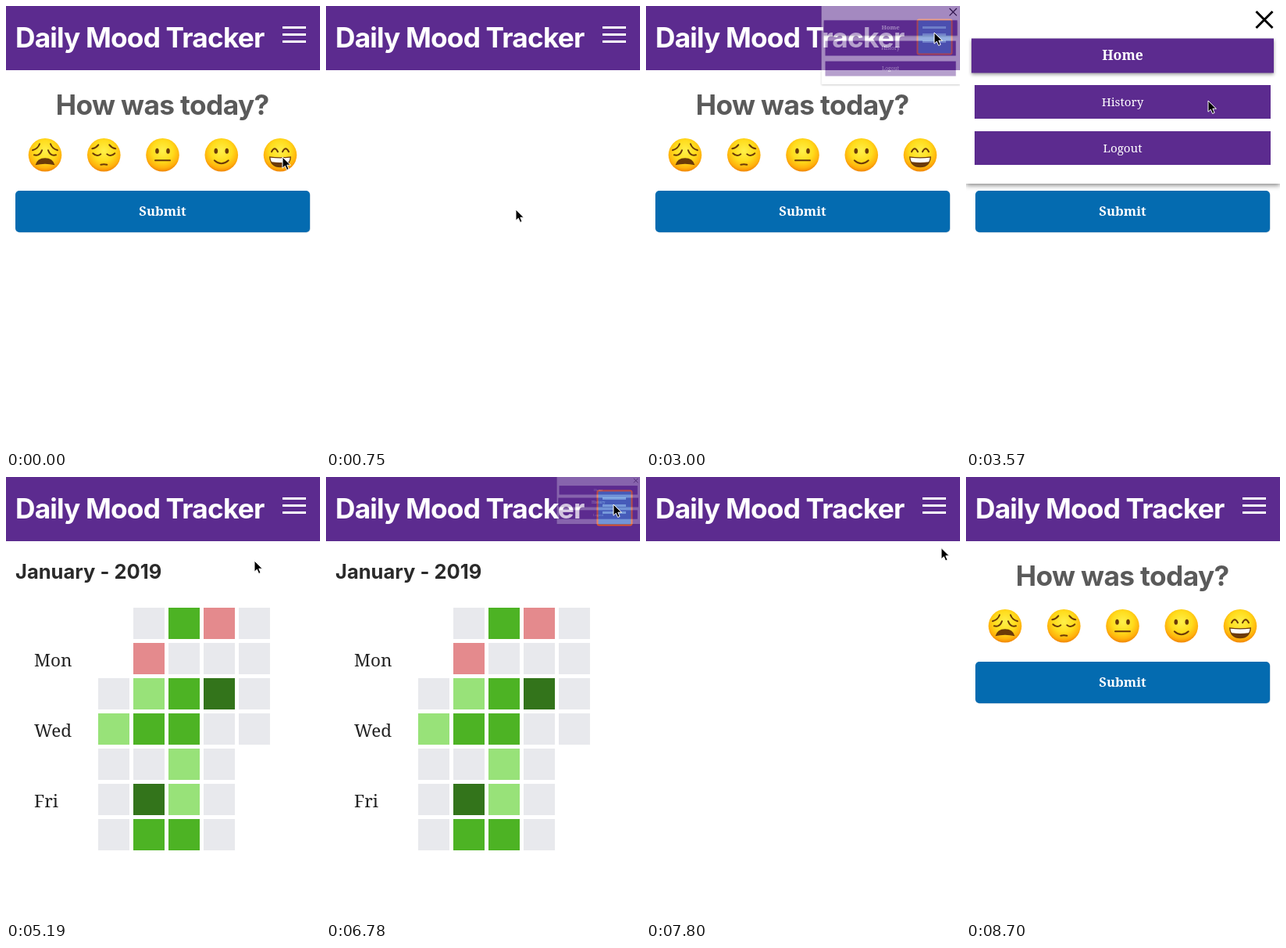
Recreate the animation shown at these times as an HTML page. Size 402 by 566 pixels, loop 8.73 s.

```html
<!DOCTYPE html>
<html lang="en">
<head>
<meta charset="utf-8">
<title>Daily Mood Tracker</title>
<style>
  html, body { margin: 0; width: 100%; height: 100%; overflow: hidden; background: #fff; }
  svg { display: block; width: 402px; height: 566px; }
  .sans { font: 700 35.3px Inter, "Open Sans", sans-serif; }
  .serif { font: 15.2px "Noto Serif", "Liberation Serif", serif; }
  .bold { font-weight: 800; font-size: 16.6px; }
  .mid { text-anchor: middle; }
  .day { font-size: 22.5px; fill: #222; }
  .month { font-size: 25.5px; }
  .face { fill: none; stroke: #6b3a08; stroke-width: 2; stroke-linecap: round; }
  .sheet { filter: drop-shadow(0 2px 3px rgba(0, 0, 0, .5)); }
  .item rect { fill: #5c2b8f; }
  .item text { fill: #fff; }
  .item.on rect { filter: drop-shadow(0 2px 2px rgba(0, 0, 0, .4)); }
  .item.on text { font-weight: 700; font-size: 17.6px; }
</style>
</head>
<body>
<svg viewBox="0 0 402 566" xmlns="http://www.w3.org/2000/svg">
  <defs>
    <radialGradient id="skin" cx=".5" cy=".38" r=".64">
      <stop offset="0" stop-color="#fff04a"/>
      <stop offset=".5" stop-color="#ffdc1c"/>
      <stop offset=".8" stop-color="#ffb20c"/>
      <stop offset="1" stop-color="#ee7c02"/>
    </radialGradient>
    <circle id="head" r="21.3" fill="url(#skin)"/>
    <g id="eyes" fill="#6b3a08">
      <ellipse cx="-7" cy="-5" rx="2.3" ry="3.5"/>
      <ellipse cx="7" cy="-5" rx="2.3" ry="3.5"/>
    </g>
  </defs>

  <rect width="402" height="82" fill="#5c2b8f"/>
  <text class="sans" x="12" y="53" fill="#fff" letter-spacing="-.024em">Daily Mood Tracker</text>
  <path d="M354 27.5h30m-30 9h30m-30 9h30" stroke="#fff" stroke-width="2.8"/>
  <rect id="tap" x="347.5" y="17.5" width="44" height="44" rx="2"
        fill="#2c9af0" fill-opacity=".6" stroke="#e0582c" stroke-width="2"/>

  <g id="form">
    <text class="sans mid" x="200.2" y="139" fill="#5a5a5a" letter-spacing="-.018em">How was today?</text>
    <g transform="translate(50 190.3)">
      <use href="#head"/>
      <path class="face" d="M-16-6Q-9-8-7-14M16-6Q9-8 7-14M-14 0Q-7 2-4-6M14 0Q7 2 4-6"/>
      <path d="M-12.5 13Q-10 4 0 4T12.5 13Q0 10-12.5 13Z" fill="#6b3a08"/>
    </g>
    <g transform="translate(125.3 190.3)">
      <use href="#head"/>
      <path class="face" d="M-15-8Q-10-9-7-13M15-8Q10-9 7-13M-14-2Q-9 3-4-1M14-2Q9 3 4-1M-4 12.5Q0 11.5 4 12.5"/>
    </g>
    <g transform="translate(200.5 190.3)">
      <use href="#head"/><use href="#eyes"/>
      <path class="face" d="M-9.5 7H9.5"/>
    </g>
    <g transform="translate(275.8 190.3)">
      <use href="#head"/><use href="#eyes"/>
      <path class="face" d="M-9 7Q0 15 9 7"/>
    </g>
    <g transform="translate(351 190.3)">
      <use href="#head"/>
      <path class="face" d="M-11-4Q-7-12-3-4M11-4Q7-12 3-4"/>
      <path d="M-14 2Q0 4 14 2Q13 16 0 16T-14 2Z" fill="#6b3a08"/>
      <path d="M-12.5 3.5Q0 5 12.5 3.5Q12 8 10.5 9Q0 10.5-10.5 9Q-12 8-12.5 3.5Z" fill="#fff"/>
    </g>
    <rect x="12.5" y="236.5" width="377" height="53" rx="5" fill="#9db9cd"/>
    <rect x="12" y="236" width="377" height="53" rx="5" fill="#046bb0"/>
    <text class="serif bold mid" x="200.5" y="268" fill="#fff">Submit</text>
  </g>

  <g id="history">
    <text class="sans month" x="12" y="130" fill="#2a2a2a">January - 2019</text>
    <g id="grid"></g>
  </g>

  <g id="menu">
    <rect class="sheet" width="402" height="227" fill="#fff"/>
    <path d="M371.5 7l21 21m0-21l-21 21" stroke="#000" stroke-width="3"/>
    <g id="items"></g>
  </g>

  <g id="cursor">
    <path id="arrow" d="M0 0V14.2L3.3 11.2L5.6 16.5L8.1 15.4L5.8 10.2H10.4Z" fill="#000" stroke="#fff"/>
    <circle id="press" r="10.5" fill="#2b1447" fill-opacity=".88" stroke="#a48fc0" stroke-width="1.8"/>
  </g>
</svg>
<script>
  const LOOP = 8730, STEP = 30, PRESS = 90, OPEN = 340, CLOSE = 150;
  // Times of the clicks.
  const submit = 570, openFirst = 2850, pickHistory = 3600, openAgain = 6690, pickHome = 7110;
  const clicks = [submit, openFirst, pickHistory, openAgain, pickHome];
  const toHistory = pickHistory + PRESS, toHome = pickHome + PRESS;

  const $ = id => document.getElementById(id);
  const add = (parent, tag, attrs, text = '') => {
    const el = document.createElementNS('http://www.w3.org/2000/svg', tag);
    for (const key in attrs) el.setAttribute(key, attrs[key]);
    el.textContent = text;
    parent.append(el);
    return el;
  };

  // One string per weekday, one letter per week.
  const shades = { n: '#e8e9ed', b: '#e48a8d', l: '#98e279', g: '#4db324', d: '#33741b' };
  const weeks = ['.ngbn', '.bnnn', 'nlgdn', 'lggnn', 'nnln.', 'ndln.', 'nggn.'];
  const labels = { 1: 'Mon', 3: 'Wed', 5: 'Fri' };
  weeks.forEach((row, r) => {
    const y = 167 + 45 * r;
    if (labels[r]) add($('grid'), 'text', { class: 'serif day', x: 36, y: y + 30 }, labels[r]);
    [...row].forEach((mood, c) => {
      if (mood in shades) add($('grid'), 'rect',
        { x: 118 + 45 * c, y, width: 40, height: 40, fill: shades[mood] });
    });
  });

  const items = ['Home', 'History', 'Logout'].map((name, i) => {
    const y = 42 + 59 * i, g = add($('items'), 'g', {});
    const box = add(g, 'rect', {});
    add(g, 'text', { class: 'serif mid', x: 200.5, y: y + 27 }, name);
    return { g, box, y };
  });

  function setActive(index) {
    items.forEach(({ g, box, y }, i) => {
      const grow = i === index ? 1 : 0;
      g.setAttribute('class', grow ? 'item on' : 'item');
      box.setAttribute('x', 11 - 4 * grow);
      box.setAttribute('y', y - .5 * grow);
      box.setAttribute('width', 379 + 8 * grow);
      box.setAttribute('height', 43 + grow);
    });
  }

  const ramp = (t, from, length) => Math.min(1, Math.max(0, (t - from) / length));
  const ease = k => k * k * (3 - 2 * k);
  const after = (t, from, length) => t >= from && t < from + length;
  const show = (id, on) => $(id).setAttribute('visibility', on ? 'visible' : 'hidden');
  const fade = (id, value) => $(id).setAttribute('opacity', value);

  // Each move bends sideways by `bow` pixels on its way.
  const home = { x: 354, y: 193 };
  const moves = [
    { from: 30, to: 690, x: 243, y: 260 },
    { from: 1650, to: 2700, x: 369, y: 34 },
    { from: 3060, to: 3540, x: 310, y: 121 },
    { from: 3630, to: 3840, x: 318, y: 107 },
    { from: 5190, to: 5490, x: 183, y: 37, bow: 220 },
    { from: 5730, to: 6600, x: 368, y: 35 },
    { from: 6840, to: 7080, x: 332, y: 74 },
    { from: 7230, to: 8190, x: 404, y: 100 }
  ];

  function cursorAt(t) {
    let { x, y } = home;
    for (const m of moves) {
      if (t <= m.from) break;
      const k = ease(ramp(t, m.from, m.to - m.from));
      const dx = m.x - x, dy = m.y - y;
      const side = (m.bow || 0) * Math.sin(Math.PI * k) / Math.hypot(dx, dy);
      x += dx * k + dy * side;
      y += dy * k - dx * side;
    }
    return [x, y];
  }

  function draw(t) {
    const switched = ramp(t, toHistory, CLOSE);
    fade('form', 1 - ramp(t, 420, 300) + ramp(t, 2520, 330) - switched + ramp(t, 8190, 510));
    fade('history', switched - ramp(t, 7290, 390));

    const open = ramp(t, openFirst, OPEN) - ramp(t, toHistory, CLOSE)
      + ramp(t, openAgain, OPEN) - ramp(t, toHome, CLOSE);
    fade('menu', open);
    $('menu').setAttribute('transform', `translate(${402 * (1 - open)} 0) scale(${open})`);
    setActive(t >= toHistory && t < toHome ? 1 : 0);
    show('tap', [openFirst, openAgain].some(c => after(t, c, OPEN)));

    const [x, y] = cursorAt(t);
    const pressed = clicks.some(c => after(t, c, PRESS)), seen = t < 8190;
    $('cursor').setAttribute('transform', `translate(${x} ${y})`);
    show('arrow', seen && !pressed);
    show('press', seen && pressed);
  }

  const start = performance.now();
  function tick() {
    const t = (performance.now() - start) % LOOP;
    draw(Math.floor(t / STEP) * STEP);
    requestAnimationFrame(tick);
  }
  draw(0);
  requestAnimationFrame(tick);
</script>
</body>
</html>
```
